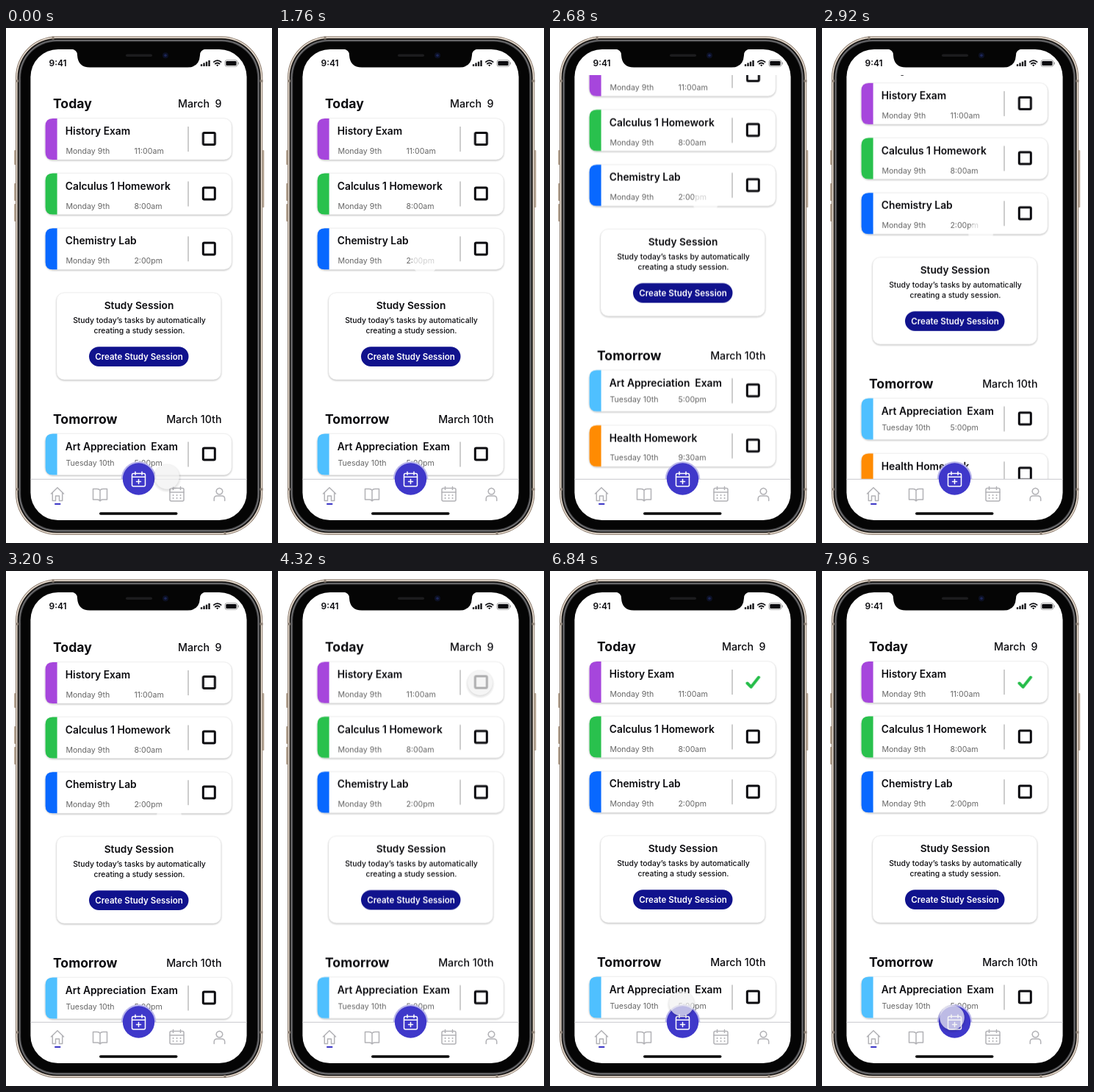
Write an HTML page that moves like this. It is 362 px wide and 700 px high and loops after 8000 ms.

```html
<!DOCTYPE html>
<html lang="en">
<head>
<meta charset="utf-8">
<title>Study planner</title>
<style>
html, body { margin: 0; width: 100%; height: 100%; overflow: hidden; background: #fff; }
svg { display: block; width: 362px; height: 700px; font-family: Inter, Roboto, sans-serif; }
text { fill: #0b0b0f; white-space: pre; }
.heading { font-size: 17.6px; font-weight: 700; }
.date { font-size: 14.2px; font-weight: 500; text-anchor: end; }
.title { font-size: 13.8px; font-weight: 600; }
.meta { font-size: 10.6px; fill: #666; }
.mid { text-anchor: middle; }
.note { font-size: 10.4px; font-weight: 450; }
.panel { fill: #fff; stroke: #ececec; stroke-width: .6; filter: drop-shadow(0 1.3px 1px #0004); }
.box { fill: none; stroke: #0b0b0f; stroke-width: 3; }
.tick { fill: none; stroke: #25bd49; stroke-width: 4; stroke-linecap: round; stroke-linejoin: round; }
.icon { fill: none; stroke: #b2b2b6; stroke-width: 1.5; stroke-linecap: round; stroke-linejoin: round; }
.icon.light { stroke: #fff; }

#content { animation: scroll 8s infinite; }
#cursor { animation: move 8s infinite; }
#cursor .shade { animation: shade 8s linear infinite; }
#todo { animation: todo 8s step-end infinite; }
#done { animation: done 8s step-end infinite; }

@keyframes scroll {
  0%, 22.4% { transform: translateY(0); animation-timing-function: ease-in-out; }
  30%, 33.5% { transform: translateY(-86.5px); animation-timing-function: ease-in-out; }
  40% { transform: translateY(1px); animation-timing-function: linear; }
  54% { transform: translateY(.5px); animation-timing-function: linear; }
  70%, 100% { transform: translateY(0); }
}
@keyframes move {
  0%, 3% { transform: translate(219px, 610px); animation-timing-function: ease-in-out; }
  18%, 22.4% { transform: translate(200px, 319px); animation-timing-function: ease-in-out; }
  30%, 33.5% { transform: translate(211.5px, 238px); animation-timing-function: ease-in-out; }
  40%, 43% { transform: translate(222px, 333px); animation-timing-function: ease-in-out; }
  52%, 70% { transform: translate(275px, 152px); animation-timing-function: ease-in-out; }
  85.5% { transform: translate(179px, 588px); animation-timing-function: ease-in-out; }
  92%, 100% { transform: translate(177px, 607px); }
}
@keyframes shade {
  0%, 15% { opacity: 1; }
  20%, 43% { opacity: 0; }
  49%, 100% { opacity: 1; }
}
@keyframes todo { 0% { opacity: 1; } 56% { opacity: 0; } }
@keyframes done { 0% { opacity: 0; } 56% { opacity: 1; } }
</style>
</head>
<body>
<svg viewBox="0 0 362 700">
  <defs>
    <radialGradient id="soft">
      <stop offset=".65" stop-color="#000" stop-opacity=".2"/>
      <stop offset="1" stop-color="#000" stop-opacity="0"/>
    </radialGradient>
    <clipPath id="view"><rect x="33.5" y="64.5" width="294" height="548.5"/></clipPath>
    <clipPath id="upper"><rect x="150" y="580" width="62" height="33"/></clipPath>
    <mask id="ring">
      <rect x="-25" y="-25" width="50" height="50" fill="#fff"/>
      <circle r="16.5" fill="#000"/>
    </mask>
  </defs>

  <!-- phone body: nested rims from the outside in -->
  <g fill="#b6a594">
    <rect x="11" y="166" width="2.5" height="20" rx="1"/>
    <rect x="11" y="211" width="2.5" height="24" rx="1"/>
    <rect x="11" y="239" width="2.5" height="24" rx="1"/>
    <rect x="348.8" y="166" width="2.5" height="78" rx="1"/>
  </g>
  <g id="body"></g>
  <path d="M13 72h4M345.5 72h4M13 627h4M345.5 627h4M64 11.5v4M298 685v4" stroke="#8d8176" stroke-width="3"/>
  <rect x="33.4" y="29" width="294.2" height="640" rx="37.5" fill="#fff"/>
  <path d="M89 28.5Q97 29.5 97 37Q98 53.5 114 53.5H247Q263 53.5 264 37Q264 29.5 272 28.5Z" fill="#050505"/>
  <rect x="163" y="35.5" width="36" height="3.6" rx="1.8" fill="#1c1c1e"/>
  <circle cx="217" cy="37.3" r="4" fill="#0c1024"/>
  <circle cx="217" cy="37.3" r="1.8" fill="#1c2658"/>

  <!-- status bar -->
  <text x="58.5" y="52" font-size="12" font-weight="600">9:41</text>
  <path d="M266 52v-2.8M269.5 52v-4.5M273 52v-6.3M276.5 52v-8" stroke="#0b0b0f" stroke-width="2.3"/>
  <g fill="none" stroke="#0b0b0f" stroke-width="1.7">
    <path d="M282.2 46.6Q287.7 41.8 293.2 46.6M284.2 49Q287.7 46 291.2 49"/>
    <path d="M286 50.3L287.7 52.2L289.4 50.3Q287.7 49 286 50.3Z" fill="#0b0b0f" stroke="none"/>
  </g>
  <rect x="298" y="43.7" width="16.8" height="8.6" rx="2.4" fill="#fff" stroke="#888" stroke-width=".8"/>
  <rect x="299.3" y="45" width="14.2" height="6" rx="1.3" fill="#0b0b0f"/>
  <path d="M316.3 46.5v3" stroke="#888" stroke-width="1.1"/>

  <g clip-path="url(#view)">
    <g id="content">
      <text class="heading" x="64" y="109">Today</text>
      <text class="date" x="293.5" y="108">March  9</text>
      <g id="cards"></g>
      <rect class="panel" x="69" y="360" width="223.5" height="118" rx="10"/>
      <text class="mid" x="181" y="381.5" font-size="13.7" font-weight="600">Study Session</text>
      <text class="mid note" x="181.5" y="401">Study today’s tasks by automatically</text>
      <text class="mid note" x="181.5" y="414.5">creating a study session.</text>
      <rect x="113" y="433.2" width="135.5" height="26.8" rx="13.4" fill="#10128d"/>
      <text class="mid" x="181" y="451" font-size="11.5" font-weight="600" style="fill:#fff">Create Study Session</text>
      <text class="heading" x="64" y="538">Tomorrow</text>
      <text class="date" x="293.5" y="537">March 10th</text>
    </g>
  </g>

  <!-- tab bar -->
  <path d="M33.5 613.3H327.5" stroke="#d2d2d6" stroke-width="1.2"/>
  <path class="icon" d="M61.5 633L70 624.8L78.5 633M63.3 631.5V642.5H67.5V636H72.5V642.5H76.7V631.5"/>
  <rect x="66" y="646" width="8.5" height="2" rx="1" fill="#3c36c6"/>
  <path class="icon" d="M128 628.5Q127 626.5 124 626.5H118.5V641H124.5Q127 641 128 643Q129 641 131.5 641H137.5V626.5H132Q129 626.5 128 628.5V643"/>
  <g class="icon">
    <rect x="223" y="625.5" width="19" height="17.5" rx="2"/>
    <path d="M223 631H242M227.5 623.5v4M237.5 623.5v4"/>
    <path d="M227.5 635h.1M232.5 635h.1M237.5 635h.1M227.5 639h.1M232.5 639h.1M237.5 639h.1" stroke-width="2"/>
  </g>
  <path class="icon" d="M290.5 625.5a4.3 4.3 0 1 1-.1 0M283.2 642.5V640Q283.2 636 287.2 636H293.7Q297.7 636 297.7 640V642.5"/>
  <circle cx="180.5" cy="613" r="23.8" fill="#b9b6ea" clip-path="url(#upper)"/>
  <circle cx="180.5" cy="613" r="21.7" fill="#3f38ca"/>
  <g class="icon light">
    <rect x="171.5" y="605.5" width="18" height="17.5" rx="2"/>
    <path d="M171.5 610.3H189.5M176 603.3v4M185 603.3v4M180.5 613.5v6M177.5 616.5h6"/>
  </g>
  <rect x="127" y="658.3" width="106.5" height="3.4" rx="1.7" fill="#050505"/>

  <g id="cursor">
    <circle cy="1.5" r="20" fill="url(#soft)" mask="url(#ring)" class="shade"/>
    <circle r="16.8" fill="#fff" fill-opacity=".7"/>
    <circle r="16.8" fill-opacity=".04" class="shade"/>
  </g>
</svg>
<script>
// [inset, colour]
const rims = [
  [0, '#8a7a6c'], [1, '#f1e6da'], [2.4, '#4b443e'], [3.4, '#0a0a0a'],
  [4.6, '#77777a'], [6, '#48484a'], [7.2, '#050505'],
];

// [y, colour, title, day, time, baseline of the day and time]
const tasks = [
  [123, '#a646dc', 'History Exam', 'Monday 9th', '11:00am', 48],
  [197.5, '#29c14d', 'Calculus 1 Homework', 'Monday 9th', '8:00am', 48],
  [272.3, '#0868ff', 'Chemistry Lab', 'Monday 9th', '2:00pm', 48],
  [551.5, '#4fc0ff', 'Art Appreciation  Exam', 'Tuesday 10th', '5:00pm', 43.5],
  [626.5, '#ff8b02', 'Health Homework', 'Tuesday 10th', '9:30am', 47.5],
];

const rim = ([inset, color]) => `
  <rect x="${13 + inset}" y="${11.3 + inset}" width="${336.3 - 2 * inset}"
    height="${677.7 - 2 * inset}" rx="${56 - inset}" fill="${color}"/>`;

const card = ([y, color, title, day, time, base], i) => `
  <g transform="translate(53.6 ${y})">
    <rect class="panel" width="253.4" height="56" rx="10"/>
    <path d="M16 0H10Q0 0 0 10V46Q0 56 10 56H16Z" fill="${color}"/>
    <text class="title" x="27.2" y="22">${title}</text>
    <text class="meta" x="27.8" y="${base}">${day}</text>
    <text class="meta" x="120.8" y="${base}">${time}</text>
    <path d="M194.4 11V45" stroke="#bdbdbd" stroke-width="1.5"/>
    <rect class="box" x="214.7" y="19.6" width="16" height="16" rx="1.5" ${i ? '' : 'id="todo"'}/>
    ${i ? '' : '<path id="done" class="tick" d="M214.9 29.5L219.9 34.7L230.4 21.5"/>'}
  </g>`;

document.getElementById('body').innerHTML = rims.map(rim).join('');
document.getElementById('cards').innerHTML = tasks.map(card).join('');
</script>
</body>
</html>
```
